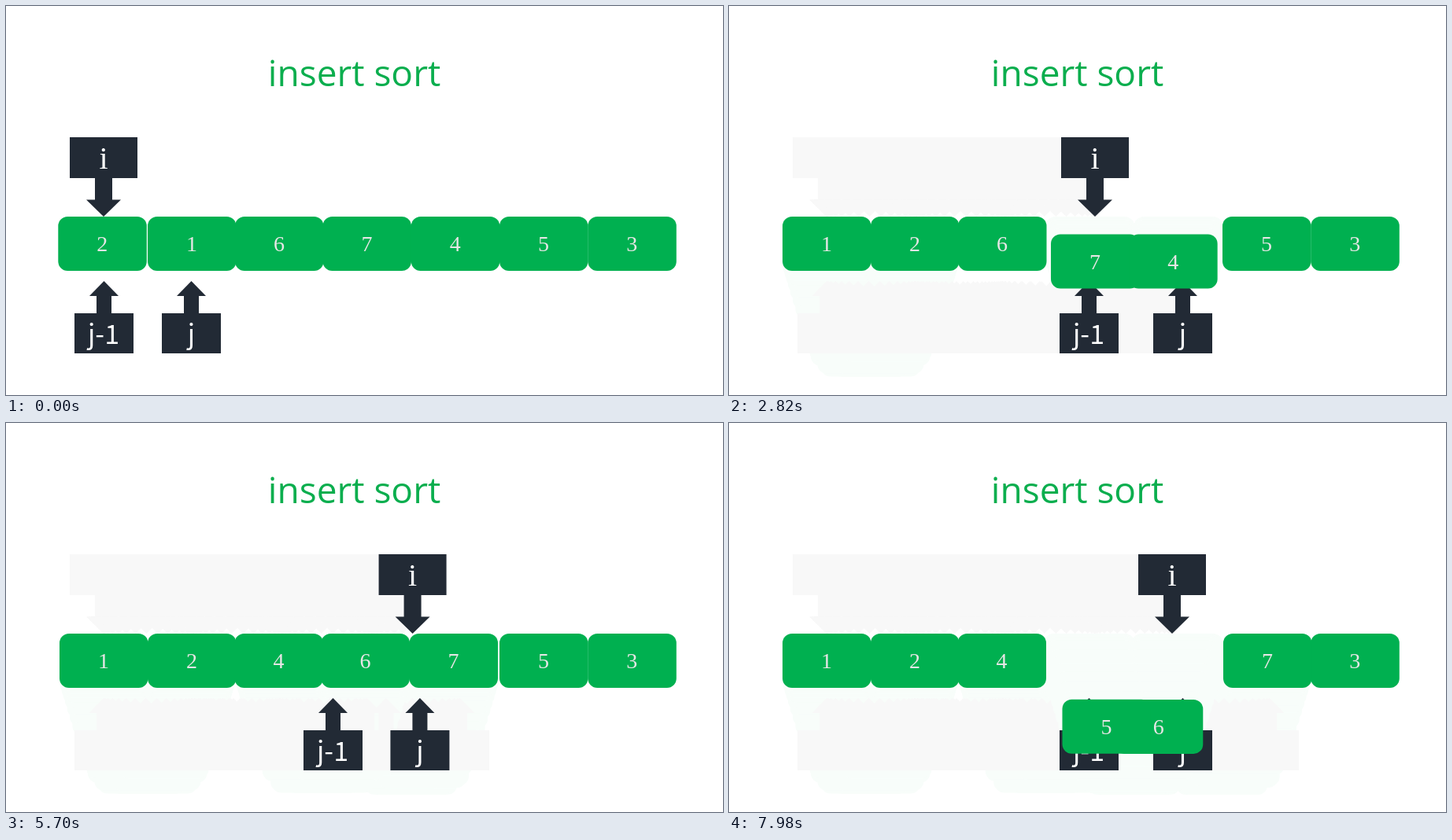
Write an HTML page with a canvas that moves like this. It is 911x495 px and loops after 8 s.

```html
<!DOCTYPE html>
<html lang="en">
<head>
<meta charset="utf-8">
<title>insert sort</title>
<style>
  html, body { margin: 0; width: 100%; height: 100%; overflow: hidden; background: #fff; }
  canvas, svg { position: absolute; left: 0; top: 0; width: 911px; height: 495px; }
  text { text-anchor: middle; }
  .title { font: 46px "Open Sans", "Noto Sans", sans-serif; fill: #0bae4e; }
  .block path { fill: #00b050; }
  .block text { font: 28px "Liberation Serif", serif; fill: #e7e6e6; }
  .arrow path { fill: #222a35; }
  .arrow text { font: 300 34px "Noto Sans CJK SC", "Noto Sans CJK", "Noto Sans", sans-serif; fill: #fff; }
  .arrow .index { font: 40px "Liberation Serif", serif; }
</style>
</head>
<body>
<canvas width="911" height="495"></canvas>
<svg viewBox="0 0 911 495">
  <text class="title" x="442.5" y="102">insert sort</text>
</svg>
<script>
const LOOP = 8000, STEP = 30, SWAP = 900, SLIDE = 450, DEPTH = 136;
const NS = 'http://www.w3.org/2000/svg';
const svg = document.querySelector('svg');
const trail = document.querySelector('canvas').getContext('2d');

const BLOCK = 'M12 268H100.5a12 12 0 0 1 12 12V325a12 12 0 0 1-12 12H12a12 12 0 0 1-12-12V280a12 12 0 0 1 12-12Z';
const DOWN = 'M0 167H86V219H54V246.500H65L43 268L21 246.500H32V219H0Z';
const UP = 'M0 442V391H28V369H19L37.500 350L56 369H47V391H75V442Z';

function add(parent, tag, attributes, content = '') {
  const node = document.createElementNS(NS, tag);
  for (const name in attributes) node.setAttribute(name, attributes[name]);
  node.textContent = content;
  return parent ? parent.appendChild(node) : node;
}

const items = {};
function addItem(key, kind, shape, x, label, textX, textY, textClass = '') {
  const node = add(svg, 'g', { class: kind });
  add(node, 'path', { d: shape });
  add(node, 'text', { x: textX, y: textY, class: textClass }, label);
  const ghost = kind === 'block' ? '#f8fdfa' : '#f8f8f8';
  items[key] = { node, x, ghost, shape: new Path2D(shape), isBlock: kind === 'block' };
}

addItem('i', 'arrow', DOWN, 81, 'i', 43, 207, 'index');
addItem('prev', 'arrow', UP, 87, 'j-1', 37, 430);
addItem('j', 'arrow', UP, 198, 'j', 37.5, 430);
[2, 1, 6, 7, 4, 5, 3].forEach((digit, slot) =>
  addItem(digit, 'block', BLOCK, [66.3, 180, 291, 402.5, 514.8, 627, 739.3][slot], digit, 56, 312));

// Start time and the new left edge of every part that moves.
const moves = [
  [190, { 1: 68, 2: 180 }],
  [1130, { i: 195, prev: 198, j: 310 }],
  [1651, { i: 308, prev: 309, j: 425 }],
  [2130, { i: 422, prev: 420, j: 539 }],
  [2643, { 7: 512.5, 4: 402.5 }],
  [3553, { prev: 309, j: 421 }],
  [4093, { 6: 400.5, 4: 290.5 }],
  [5013, { prev: 198, j: 310 }],
  [5469, { i: 520, prev: 540, j: 649 }],
  [5998, { 7: 628, 5: 512 }],
  [6910, { prev: 420, j: 539 }],
  [7421, { 6: 515, 5: 398.5 }]
];

// Sloping sides joined by a rounded bottom.
function dipPath(dx) {
  const at = (x, y) => `${x * dx / 2} ${y * DEPTH} `;
  const d = 'M0 0L' + at(.53, .742) +
    'C' + at(.64, .914) + at(.81, 1) + at(1, 1) +
    'C' + at(1.19, 1) + at(1.36, .914) + at(1.47, .742) + 'L' + at(2, 0);
  const path = add(null, 'path', { d });
  const length = path.getTotalLength();
  return p => path.getPointAtLength(p * length);
}

const slidePath = dx => p => ({ x: dx * p, y: 0 });

for (const key in items) {
  const item = items[key];
  let x = item.x;
  item.moves = moves.filter(([, goals]) => key in goals).map(([start, goals]) => {
    const dx = goals[key] - x;
    const move = { start, x, path: item.isBlock ? dipPath(dx) : slidePath(dx) };
    x = goals[key];
    return move;
  });
}

const ease = p => p < .5 ? 2 * p * p : 1 - 2 * (1 - p) ** 2;

function position(item, time) {
  const move = item.moves.filter(m => m.start <= time).pop();
  if (!move) return { x: item.x, y: 0 };
  const progress = Math.min(1, (time - move.start) / (item.isBlock ? SWAP : SLIDE));
  const { x, y } = move.path(ease(progress));
  return { x: move.x + x, y };
}

// Every part leaves a faint mark where it has been.
function leaveMarks(time) {
  for (const item of Object.values(items)) {
    const from = position(item, time), to = position(item, time + STEP);
    if (Math.hypot(to.x - from.x, to.y - from.y) < .01) continue;
    trail.setTransform(1, 0, 0, 1, from.x, from.y);
    trail.fillStyle = item.ghost;
    trail.fill(item.shape);
  }
}

let marked = 0;
function draw(time) {
  if (time < marked) {
    trail.resetTransform();
    trail.clearRect(0, 0, 911, 495);
    marked = 0;
  }
  for (; marked < time; marked += STEP) leaveMarks(marked);
  for (const item of Object.values(items)) {
    const { x, y } = position(item, time);
    item.node.setAttribute('transform', `translate(${x} ${y})`);
  }
}

const begin = performance.now();
function tick() {
  const time = (performance.now() - begin) % LOOP;
  draw(Math.floor(time / STEP) * STEP);
  requestAnimationFrame(tick);
}
tick();
</script>
</body>
</html>
```
